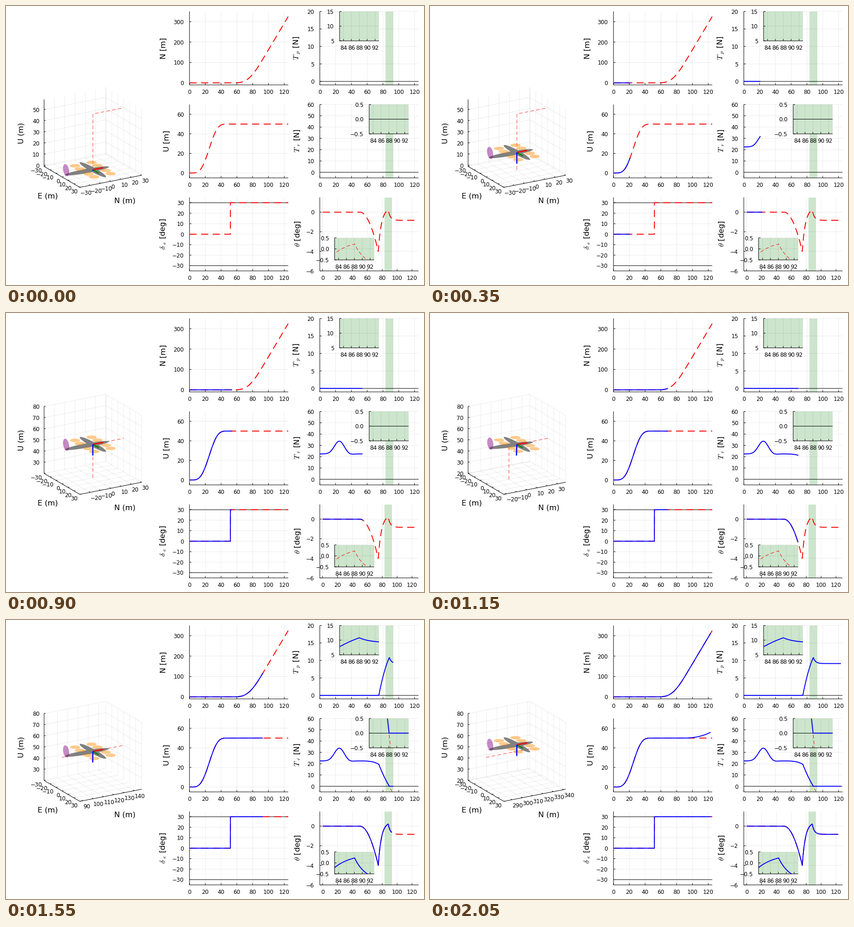
Write a matplotlib script that moves like this. It is 900 by 600 pixels and loops after 3100 ms.

```python
import numpy as np
import matplotlib.pyplot as plt
from matplotlib.animation import FuncAnimation
from matplotlib.patches import Polygon, Rectangle

W, H, DPI = 900, 600, 100
PX = 72 / DPI
STEP_MS, FRAMES, LAST = 50, 62, 41

plt.rcParams["font.family"] = "DejaVu Sans"
plt.rcParams["mathtext.fontset"] = "cm"

fig = plt.figure(figsize=(W / DPI, H / DPI), dpi=DPI, facecolor="white")
ax = fig.add_axes([0, 0, 1, 1])
ax.set_xlim(0, W)
ax.set_ylim(H, 0)
ax.axis("off")

THIN, THICK = 0.96 * PX, 1.92 * PX
GRID = dict(color="black", alpha=0.08, lw=THIN)
INK = dict(color="black", lw=PX)
DASH = (0, (8, 5))


# ---------- flight profile ----------
def unit(t, a, b):
    return np.clip((t - a) / (b - a), 0, 1)


t = np.linspace(0, 125, 2501)

u = unit(t, 0, 50)
up_ref = 50 * (126*u**5 - 420*u**6 + 540*u**7 - 315*u**8 + 70*u**9)
up = up_ref + 5.9 * (np.clip(t - 88, 0, None) / 35) ** 2.36

CRUISE, RAMP = 6.5, 50
v = unit(t, 50, 50 + RAMP)
north = CRUISE * (RAMP * (7*v**5 - 14*v**6 + 10*v**7 - 2.5*v**8)
                  + np.clip(t - 50 - RAMP, 0, None))

elevator = np.where(t < 51.8, 0.0, 30.0)

T1, T2 = 74.7, 88.05
x = t - T1
push = np.where(t < T1, 0, 1.141 * x - 0.0246 * x**2)
push = np.where(t > T2, 9.12 + 1.68 * np.exp(-(t - T2) / 2.77), push)

hump = 4 * u * (1 - u)
lift = 22.4 + 11.3 * hump**8 + 2.35 * hump**3 * (1 - 2 * u)
lift -= 2.9 * unit(t, 52, T1) ** 3
lift = np.where(t > T1, 19.5 - 1.79 * x + 0.0247 * x**2, lift)
lift_cmd = np.where(t > T2, -1.45 * (t - T2), lift)
lift = np.where(t > T2, 0, lift)

pitch = -4 * unit(t, 50, T1) ** 2
pitch = np.where(t > T1, 0.413 - 4.413 * np.exp(-0.235 * x), pitch)
pitch = np.where(t > T2, -0.83 + 1.056 * np.exp(-(t - T2) / 2.8), pitch)


# ---------- flat charts ----------
def text(x, y, s, size=12, **kw):
    kw = {"ha": "center", "va": "center_baseline", "zorder": 9, **kw}
    return ax.text(x, y, s, fontsize=size * PX, **kw)


def num(v, digits=0):
    return f"{v + 0.0:.{digits}f}".replace("-", "\u2212")


class Panel:
    def __init__(self, box, xlim, ylim, xticks, yticks, z=1, digits=0):
        self.x, self.y, self.w, self.h = box
        self.xlim, self.ylim, self.z = xlim, ylim, z
        left, base = self.x, self.y + self.h
        self.area = Rectangle((left, self.y), self.w, self.h,
                              fc="white", ec="none", zorder=z)
        ax.add_patch(self.area)
        for v in xticks:
            px = self.px(v)
            self.stroke([px, px], [self.y, base], **GRID)
            self.stroke([px, px], [base, base - 4], **INK)
            text(px, base + 14, num(v))
        for v in yticks:
            py = self.py(v)
            self.stroke([left, left + self.w], [py, py], **GRID)
            self.stroke([left, left + 4], [py, py], **INK)
            text(left - 12, py, num(v, digits), ha="right")
        self.stroke([left, left, left + self.w], [self.y, base, base], **INK)

    def px(self, v):
        a, b = self.xlim
        return self.x + (v - a) / (b - a) * self.w

    def py(self, v):
        a, b = self.ylim
        return self.y + (b - v) / (b - a) * self.h

    def stroke(self, xs, ys, dz=0.2, **kw):
        return ax.plot(xs, ys, zorder=self.z + dz, snap=False,
                       solid_capstyle="butt", **kw)[0]

    def band(self, a, b):
        ax.add_patch(Rectangle((self.px(a), self.y), self.px(b) - self.px(a),
                               self.h, fc="green", alpha=0.2, ec="none",
                               zorder=self.z + 0.1))

    def level(self, v):
        self.stroke([self.x, self.x + self.w], [self.py(v)] * 2, **INK)

    def curve(self, ys, color, lw=THICK, ls="-", dz=0.4):
        line = self.stroke(self.px(t), self.py(ys), dz, color=color,
                           lw=lw, ls=ls, dash_capstyle="butt")
        line.set_clip_path(self.area)
        return line


live = []


def track(panel, ys, color="blue", **kw):
    live.append((panel.curve(ys, color, **kw), panel.px(t), panel.py(ys)))


PW, PH = 212.5, 157.9
LEFT, RIGHT = 395.1, 675.7
ROWS = (11.8, 211.8, 411.8)
SECS = range(0, 121, 20)
SPAN = (0, 125)


def panel(left, row, ylim, yticks, xlim=SPAN):
    return Panel((left, ROWS[row], PW, PH), xlim, ylim, SECS, yticks)


def inset(host, fx, fy, fh, ylim, yticks, digits=0):
    box = (host.x + fx * PW, host.y + fy * PH, 0.4 * PW, fh * PH)
    p = Panel(box, (83, 93), ylim, range(84, 93, 2), yticks, 3, digits)
    p.band(83, 93)
    return p


p_n = panel(LEFT, 0, (-10, 350), range(0, 301, 100))
p_u = panel(LEFT, 1, (-5, 70), range(0, 61, 20))
p_e = panel(LEFT, 2, (-35, 35), range(-30, 31, 10))
p_p = panel(RIGHT, 0, (-1, 20), range(0, 21, 5))
p_r = panel(RIGHT, 1, (-5, 60), range(0, 61, 10))
p_t = panel(RIGHT, 2, (-6, 1.5), range(-6, 1, 2), (-3.75, 128.75))

for p in (p_p, p_r, p_t):
    p.band(83, 93)
for p, v in ((p_e, 30), (p_e, -30), (p_p, 0), (p_r, 0)):
    p.level(v)

i_p = inset(p_p, 0.2, 0, 0.4, (5, 15), (5, 10, 15))
i_r = inset(p_r, 0.5, 0, 0.4, (-0.5, 0.5), (-0.5, 0, 0.5), 1)
i_t = inset(p_t, 0.15, 0.55, 0.3, (-0.5, 0.5), (-0.5, 0, 0.5), 1)
i_r.level(0)

for p, ys in ((p_n, north), (p_u, up_ref), (p_e, elevator), (p_t, pitch)):
    p.curve(ys, "red", ls=DASH, dz=0.3)
i_t.curve(pitch, "red", lw=THIN, ls=DASH, dz=0.3)
for p in (p_r, i_r):
    track(p, lift_cmd, "red", lw=THIN, ls=DASH, dz=0.3)
for p, ys in ((p_n, north), (p_u, up), (p_e, elevator), (p_p, push),
              (i_p, push), (p_r, lift), (i_r, lift), (p_t, pitch), (i_t, pitch)):
    track(p, ys)

LABEL = 16.3
for lx, ly, s in ((339, 91, "N [m]"), (346, 290, "U [m]"),
                  (339, 490, r"$\delta_{\;\,e}$ [deg]"),
                  (627, 90, r"$T_{\;\,p}$ [N]"),
                  (628, 290, r"$T_{\;\,r}$ [N]"),
                  (628, 490, r"$\theta$ [deg]"), (33, 273, "U (m)")):
    text(lx, ly, s, LABEL, rotation=90, va="center")
text(90, 408, "E (m)", LABEL)
text(256, 417, "N (m)", LABEL)


# ---------- space view ----------
R = 30
ring = np.linspace(0, 2 * np.pi, 80)
COS, SIN = np.cos(ring), np.sin(ring)
scene = []


def project(n, e, h):
    """Offsets from the box centre, with height above its floor, to pixels."""
    return 187 + 2.217 * n + 1.283 * e, 354.5 - 0.4333 * n + 0.75 * e - 2.4 * h


def path3(n, e, h, **kw):
    scene.extend(ax.plot(*project(*map(np.asarray, (n, e, h))), snap=False,
                         solid_capstyle="butt", dash_capstyle="butt", **kw))


def ticks(lo):
    vals = np.arange(np.ceil(lo / 10) * 10, lo + 2 * R + 0.01, 10)
    return [(v, v - lo) for v in vals]


def draw_box(n_lo, u_lo):
    tick = dict(INK, zorder=1)
    grid = dict(GRID, zorder=1)
    for v, d in ticks(n_lo):
        n = d - R
        path3([n, n, n], [R, -R, -R], [0, 0, 2 * R], **grid)
        path3([n, n], [R, R - 2], [0, 0], **tick)
        x, y = project(n, R, 0)
        scene.append(text(x + 0.5, y + 11, num(v), ha="left"))
    for v, d in ticks(-R):
        e = d - R
        path3([-R, R, R], [e, e, e], [0, 0, 2 * R], **grid)
        path3([-R, 1.4 - R], [e, e], [0, 0], **tick)
        x, y = project(-R, e, 0)
        scene.append(text(x - 4.5, y + 8.5, num(v), ha="right"))
    for v, h in ticks(u_lo):
        path3([-R, R, R], [-R, -R, R], [h, h, h], **grid)
        path3([-R, 1.4 - R], [-R, -R], [h, h], **tick)
        x, y = project(-R, -R, h)
        scene.append(text(x - 10, y, num(v), ha="right"))
    path3([-R, -R, -R, R], [-R, -R, R, R], [2 * R, 0, 0, 0], **tick)


def draw_craft(h, tilt):
    c, s = np.cos(tilt), np.sin(tilt)

    def place(n, e, z):
        return n * c - z * s, e, h + n * s + z * c

    def disc(n, e, z, color, alpha=1.0):
        pts = np.column_stack(np.broadcast_arrays(*project(*place(n, e, z))))
        scene.append(ax.add_patch(Polygon(pts, fc=color, ec="none",
                                          alpha=alpha, zorder=3)))

    disc(-5.8 + 21.2 * COS, 4.8 * SIN, 0, "#808080")
    disc(3.5 * COS, 21.3 * SIN, 0, "#808080")
    for n, e in ((8, 16), (8.5, 7.2)):
        for sn in (-1, 1):
            for se in (-1, 1):
                disc(sn * n + 4.3 * COS, se * e + 4.3 * SIN, 0, "#ff8c00", 0.45)
    disc(np.full(80, -26.0), 5.2 * COS, 4.3 + 5.2 * SIN, "purple", 0.45)

    drop = min(10, h)
    for tip, color in (((10, 0, 0), "red"), ((0, 10, 0), "green"),
                       ((0, 0, -drop), "blue")):
        ends = [place(0, 0, 0), place(*tip)]
        path3(*zip(*ends), color=color, lw=2.5 * PX, zorder=4)


def update(frame):
    now = 3 * min(frame, LAST)
    k = 60 * min(frame, LAST)
    for line, xs, ys in live:
        line.set_data(xs[:k + 1], ys[:k + 1])

    while scene:
        scene.pop().remove()
    # tiny residual once the climb has settled
    ripple = 1e-4 * np.sin(2 * np.pi * (now - 42.5) / 46) if now > 49 else 0
    u_lo = max(up_ref[k] + ripple - R, -1)
    n_mid = north[k]
    draw_box(n_mid - R, u_lo)

    n, h = north - n_mid, up_ref - u_lo
    seen = (abs(n) <= R) & (h >= 0) & (h <= 2 * R)
    path3(n[seen], 0 * n[seen], h[seen], color="red", alpha=0.85, lw=THIN,
          ls=DASH, zorder=2)
    draw_craft(up[k] - u_lo, np.radians(pitch[k]))
    return []


anim = FuncAnimation(fig, update, frames=FRAMES, init_func=lambda: [],
                     interval=STEP_MS, repeat=True, repeat_delay=0, blit=False)
plt.show()
```
